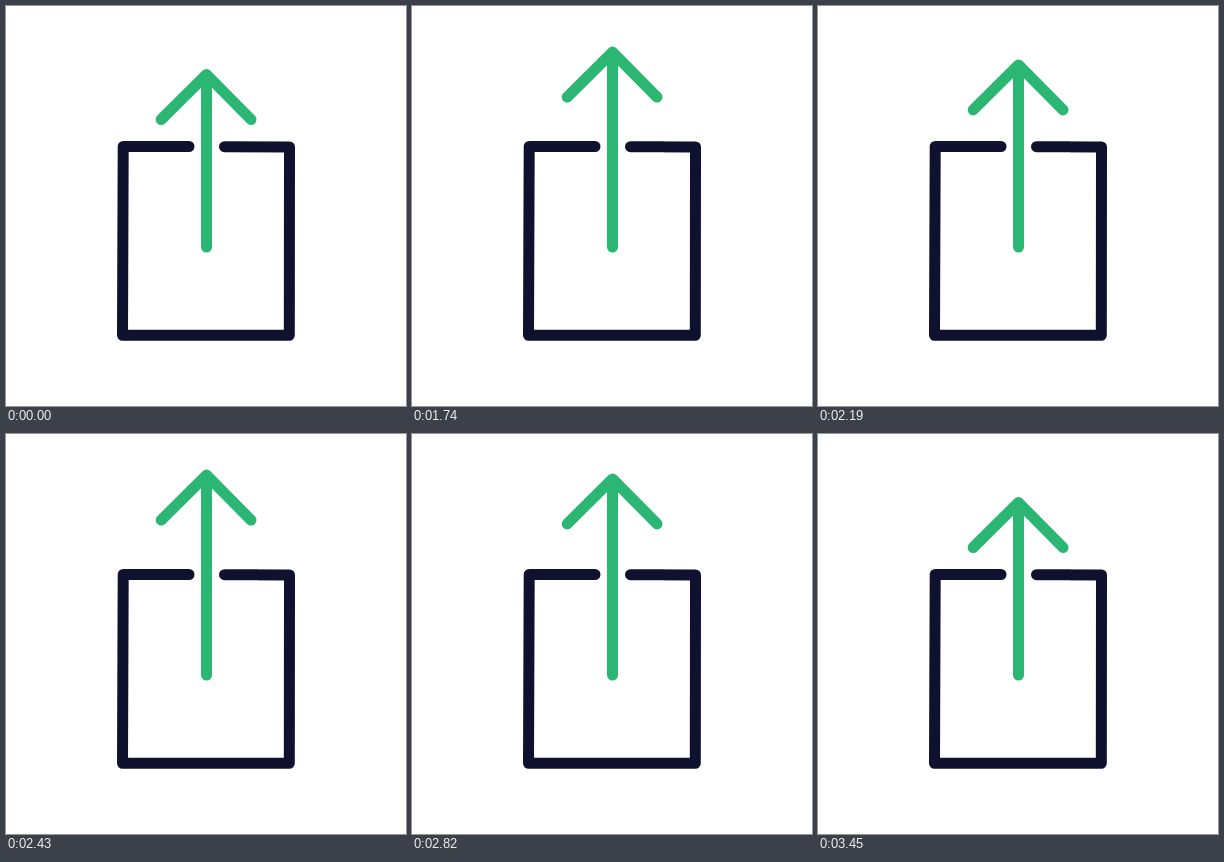
Recreate the animation shown at these times as an HTML page. Size 400x400 px, loop 5.19 s.

```html
<!DOCTYPE html>
<html lang="en">
<head>
<meta charset="utf-8">
<title>Upload icon</title>
<style>
  html, body { margin: 0; width: 100%; height: 100%; overflow: hidden; background: #fff; }
  svg { display: block; width: 100%; height: 100%; }
  path { fill: none; stroke-width: 11; stroke-linecap: round; stroke-linejoin: round; }
</style>
</head>
<body>
<svg viewBox="0 0 400 400">
  <path stroke="#10112f" d="M183 140.5L117.2 140.5L116.5 329.3L283.3 329.3L283.5 141L218.5 140.7"/>
  <path id="arrow" stroke="#2bb673"/>
</svg>
<script>
const LOOP = 5190, STEP = 30;
const arrow = document.getElementById('arrow');

// Tip height over time: [ms, y, ease-out influence, ease-in influence]
const keys = [
  [1500, 68.5, 1 / 3, 1 / 3],
  [1572, 76.7, 1 / 3, 1 / 3],
  [1794, 40.7, 1 / 3, 1 / 3],
  [2130, 60.7, 1 / 3, 1 / 3],
  [2457, 40.7, 0.8, 0.4],
  [3385, 76.7, 1 / 3, 1 / 3],
  [3450, 68.5]
];

// Cubic bezier (a, 0, 1 - b, 1), solved by bisection
function ease(x, a, b) {
  let lo = 0, hi = 1, s = x;
  for (let i = 0; i < 24; i++) {
    s = (lo + hi) / 2;
    const bx = 3 * a * s * (1 - s) ** 2 + 3 * (1 - b) * s * s * (1 - s) + s ** 3;
    if (bx < x) lo = s; else hi = s;
  }
  return s * s * (3 - 2 * s);
}

function tipAt(t) {
  const next = keys.findIndex(k => k[0] > t);
  if (next < 1) return keys[0][1];
  const [t0, y0, a, b] = keys[next - 1];
  const [t1, y1] = keys[next];
  return y0 + (y1 - y0) * ease((t - t0) / (t1 - t0), a, b);
}

function draw(t) {
  const y = tipAt(Math.floor(t / STEP + 1e-6) * STEP);
  arrow.setAttribute('d', `M200.5 241V${y}M155.2 ${y + 45}L200.5 ${y}L245 ${y + 45}`);
}

let start;
function tick(now) {
  start ??= now;
  draw((now - start) % LOOP);
  requestAnimationFrame(tick);
}
draw(0);
requestAnimationFrame(tick);
</script>
</body>
</html>
```
